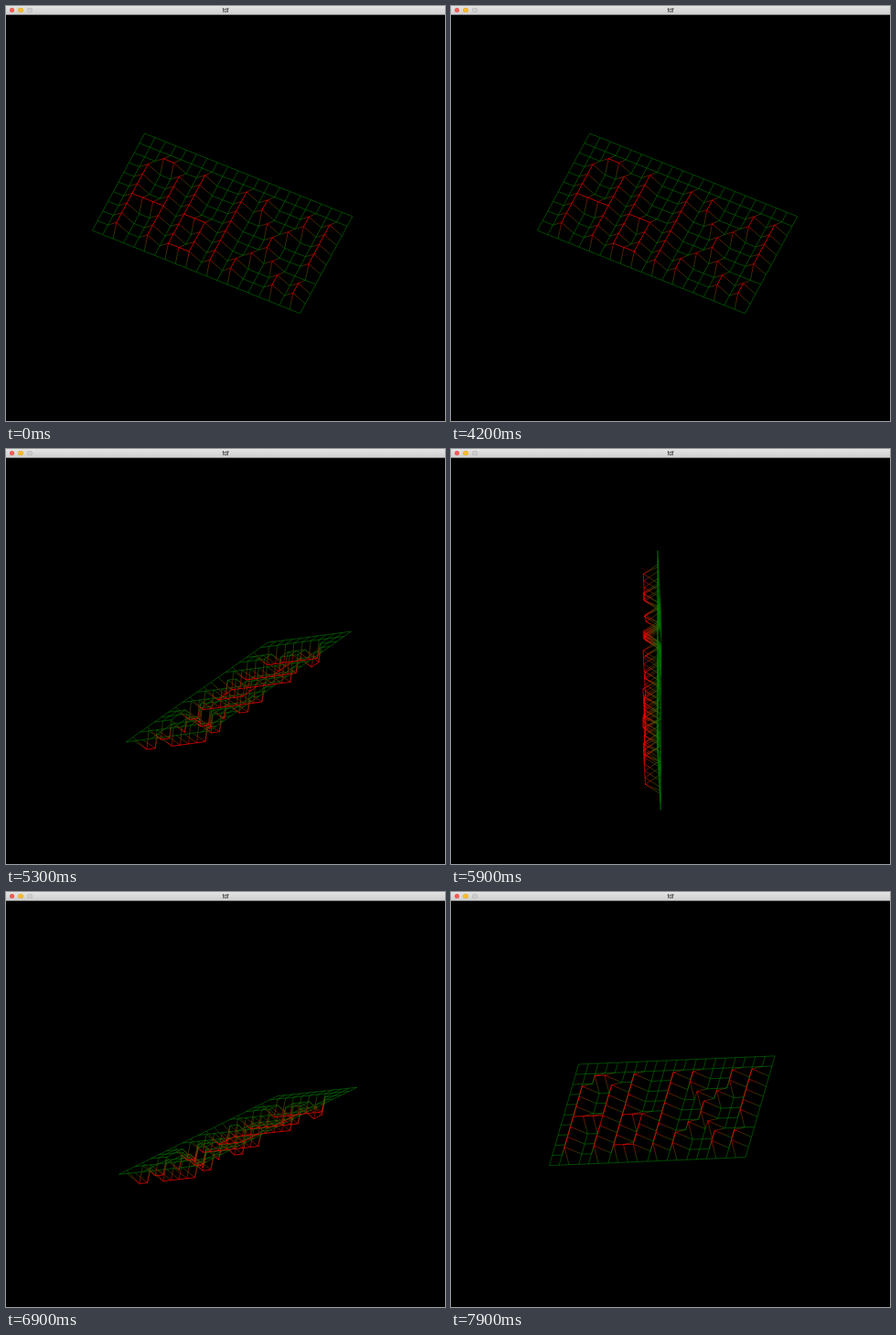
An HTML page with a canvas that plays this animation: 480x453 px, repeating every 8000 ms.

```html
<!DOCTYPE html>
<html lang="en">
<head>
<meta charset="utf-8">
<title>fdf</title>
<style>
  html, body { margin: 0; width: 100%; height: 100%; overflow: hidden; background: #000; }
  canvas { position: absolute; left: 0; top: 0; }
  .bar {
    position: absolute; left: 0; top: 0; width: 480px; height: 10px; box-sizing: border-box;
    background: linear-gradient(#e4e4e4, #d0d0d0); border-bottom: 1px solid #808080;
    font: 6.4px/9px "Liberation Sans", Arial, sans-serif; text-align: center; color: #222;
  }
  .bar i {
    position: absolute; top: 1.6px; width: 5.8px; height: 5.8px; border-radius: 50%;
    box-shadow: inset 0 0 0 0.5px rgba(0, 0, 0, 0.12);
  }
  .bar i:nth-of-type(1) { left: 3.6px; background: #ff5a52; }
  .bar i:nth-of-type(2) { left: 13.3px; background: #fdbc2e; }
  .bar i:nth-of-type(3) { left: 23px; background: #cecece; }
  .bar.idle { background: #f5f5f5; border-color: #949494; color: #999; }
  .bar.idle i { background: #d6d6d6; }
</style>
</head>
<body>
<canvas width="480" height="453"></canvas>
<div class="bar"><i></i><i></i><i></i>fdf</div>
<script>
const LOOP = 8000, SPIN_START = 4700, FRAME = 100;
const SCALE = 12.82, PEAK = 1.28, LIFT = 1.04;
const CENTER = { x: 241.1, y: 250.8 };
const TILT = 0.5, ROLL = 0.47, ISO = Math.atan(Math.SQRT2), START = 0.115;
const COLS = 21;
const RED = "#ff0000", GREEN = "#008000";

const flat = ".".repeat(COLS);
const map = [
  flat,
  flat,
  "...##..#...#.#...#.#.",
  "..#..#.#...#.#...#.#.",
  "..#..#.#...#..#.#..#.",
  "..#..#.#...#...#...#.",
  "..####.###.#...#...#.",
  "..#..#.#.#.#..#.#....",
  "..#..#.#.#.#.#...#.#.",
  "..#..#.###.#.#...#.#.",
  flat
];

const ctx = document.querySelector("canvas").getContext("2d");
const bar = document.querySelector(".bar");

function rotate(a, b, angle) {
  const c = Math.cos(angle), s = Math.sin(angle);
  return [a * c - b * s, a * s + b * c];
}

function project(col, row, up, spin) {
  let x = col - COLS / 2, y = row - map.length / 2, z = LIFT + (up ? PEAK : 0);
  [y, z] = rotate(y, z, -TILT);
  [z, x] = rotate(z, x, spin);
  [x, y] = rotate(x, y, ROLL);
  [y, z] = rotate(y, z, ISO);
  return { x: CENTER.x + x * SCALE, y: CENTER.y + y * SCALE, up };
}

function edge(a, b) {
  if (a.up === b.up) {
    ctx.strokeStyle = a.up ? RED : GREEN;
  } else {
    const g = ctx.createLinearGradient(a.x, a.y, b.x, b.y);
    g.addColorStop(0, a.up ? RED : GREEN);
    g.addColorStop(1, b.up ? RED : GREEN);
    ctx.strokeStyle = g;
  }
  ctx.lineWidth = a.up && b.up ? 0.7 : 0.56;
  ctx.beginPath();
  ctx.moveTo(a.x, a.y);
  ctx.lineTo(b.x, b.y);
  ctx.stroke();
}

function draw(spin) {
  ctx.fillStyle = "#000";
  ctx.fillRect(0, 0, 480, 453);
  const grid = map.map((line, r) =>
    [...line].map((ch, c) => project(c, r, ch === "#", spin)));
  grid.forEach((line, r) => line.forEach((p, c) => {
    if (c + 1 < COLS) edge(p, line[c + 1]);
    if (r + 1 < grid.length) edge(p, grid[r + 1][c]);
  }));
}

// Turns of 0.1 rad: quick start, four per frame, slowing at the end.
function turns(n) {
  if (n < 4) return n * (n + 1) / 2;
  const slow = n > 30 ? 2 * (n - 30) - 1 : 0;
  return 4 * n - 6 - slow;
}

let shown = -1;
function tick() {
  const t = performance.now() % LOOP;
  bar.classList.toggle("idle", t >= 700 && t < 4200);
  const n = Math.max(0, Math.floor((t - SPIN_START) / FRAME) + 1);
  if (n !== shown) {
    shown = n;
    draw(START + turns(n) / 10);
  }
  requestAnimationFrame(tick);
}
tick();
</script>
</body>
</html>
```
